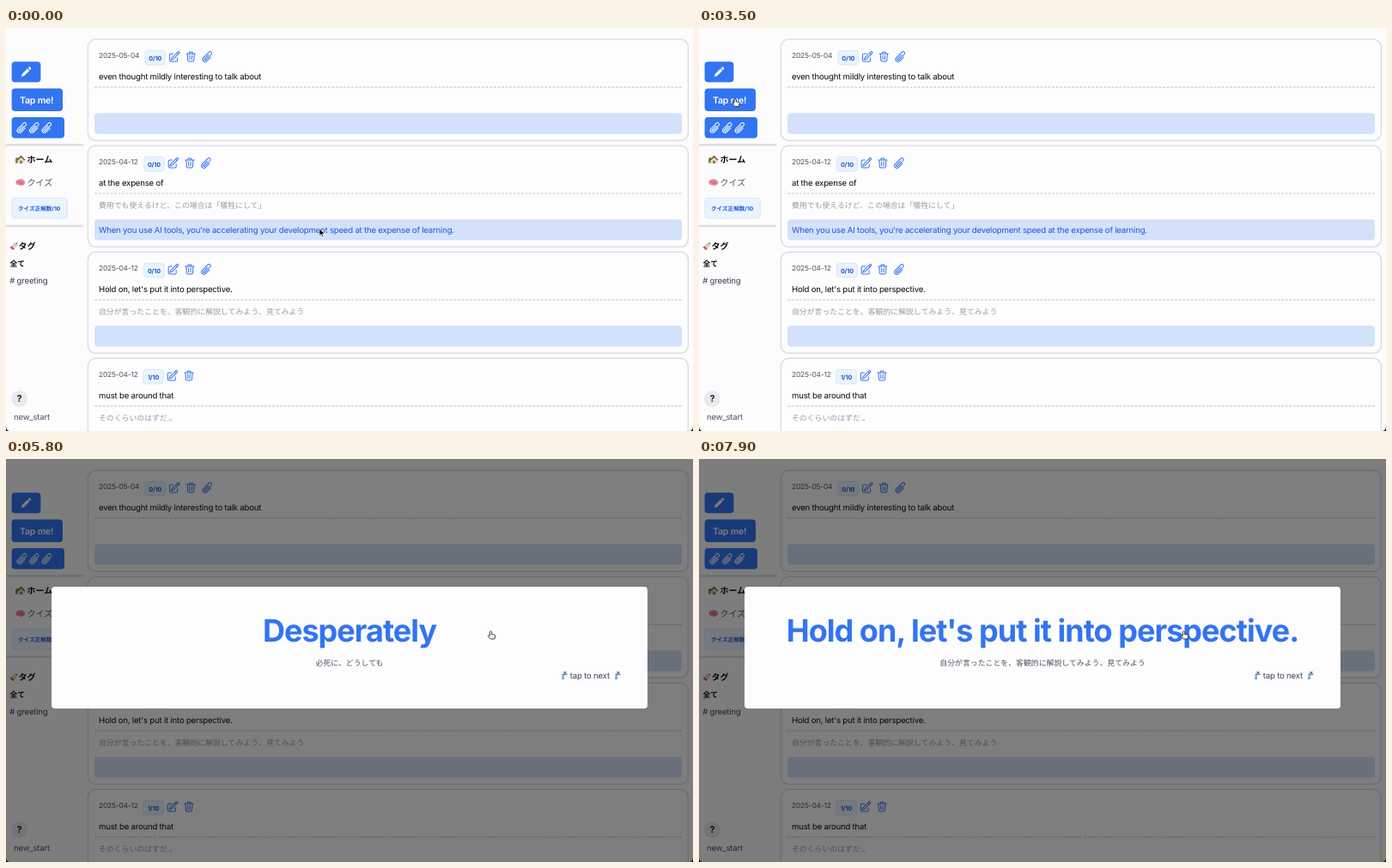
An HTML page that plays this animation: 800x470 px, repeating every 8000 ms.

```html
<!DOCTYPE html>
<html lang="ja">
<head>
<meta charset="utf-8">
<title>Phrase cards</title>
<style>
html, body { margin: 0; width: 100%; height: 100%; overflow: hidden; background: #fcfcfd; }
svg { display: block; width: 800px; height: 470px; }
text {
  font-family: Inter, "Noto Sans CJK JP", "Noto Sans CJK", sans-serif;
  font-optical-sizing: none;
  letter-spacing: -.021em;
  text-rendering: geometricPrecision;
  white-space: pre;
}
.ja { letter-spacing: 0; }
.big { letter-spacing: -.027em; }
</style>
</head>
<body>
<svg id="stage" viewBox="0 0 800 470"></svg>
<script>
const BLUE = '#3374f1', INK = '#0b0b0d', GRAY = '#4b5563', PALE = '#9a9ca4', LINK = '#1f58d6';
const LOOP = 8000, STEP = 100;

const text = (x, y, s, size, fill = INK, extra = '') =>
  `<text x="${x}" y="${y}" font-size="${size}" fill="${fill}" ${extra}>${s}</text>`;
const ja = (x, y, s, size, fill, extra = '') => text(x, y, s, size, fill, 'class="ja" ' + extra);
const box = (x, y, w, h, r, fill, stroke = 'none', sw = 1) =>
  `<rect x="${x}" y="${y}" width="${w}" height="${h}" rx="${r}" fill="${fill}" stroke="${stroke}" stroke-width="${sw}"/>`;
const at = (x, y, body, scale = 1) => `<g transform="translate(${x} ${y}) scale(${scale})">${body}</g>`;
const shape = (d, fill, extra = '') => `<path d="${d}" fill="${fill}" ${extra}/>`;
const BOLD = 'font-weight="700"', MID = 'text-anchor="middle"';

const ICONS = {
  edit: 'M16.9 4.5l1.7-1.7a1.9 1.9 0 1 1 2.6 2.65L10.6 16.1a4.5 4.5 0 0 1-1.9 1.1L6 18l.8-2.7a4.5 4.5 0 0 1 1.1-1.9zL19.5 7.1M18 14v4.75A2.25 2.25 0 0 1 15.75 21H5.25A2.25 2.25 0 0 1 3 18.75V8.25A2.25 2.25 0 0 1 5.25 6H10',
  trash: 'M3.5 6h17M8.7 6V4.5A1.5 1.5 0 0 1 10.2 3h3.6a1.5 1.5 0 0 1 1.5 1.5V6M18.8 6l-1 13.2a2.2 2.2 0 0 1-2.2 2H8.4a2.2 2.2 0 0 1-2.2-2L5.2 6M9.8 9.5l.3 8M14.2 9.5l-.3 8',
  clip: 'M18.4 12.7l-7.7 7.7a4.5 4.5 0 0 1-6.4-6.4L15.3 3.1A3 3 0 1 1 19.5 7.4L8.55 18.3a1.5 1.5 0 0 1-2.1-2.1l7.8-7.8'
};
// Icon centred on cx, cy
const icon = (name, cx, cy, color) => at(cx - 7.2, cy - 7.2,
  shape(ICONS[name], 'none', `stroke="${color}" stroke-width="1.7" stroke-linecap="round" stroke-linejoin="round"`), .6);

const house = shape('M0 9.5V6Q0 3 2 3T4 6V9.5Z', '#5f8f45') +
  shape('M2.5 10V5.5L6.5 2 10.5 5.5V10Z', '#e9d8b8') +
  shape('M1.5 5.8L6.5 .6 11.5 5.8 10.6 6.6 6.5 2.8 2.5 6.6Z', '#7b4a35') +
  shape('M5.4 10V6.8H7.6V10Z', '#8a5a3c');
const brain = shape('M.3 5.5Q0 2 3.5 1.4 7-.2 9.6 2.2 12 4 10.6 6.6 9.6 8.6 7.4 8.2L6.4 9.4 5 7.8Q1 8.4 .3 5.5Z', '#e58a9c') +
  shape('M2 4.8Q3.6 3 5 4.6T8.4 3.4M5 6.4Q7 5 9.4 6', 'none', 'stroke="#b9566e" stroke-width=".7"');
const tag = shape('M0 7.2L5.2 1.6 9 1 8.8 4.8 3.6 10.2Z', '#d9cfc4') +
  shape('M0 7.2L1.6 5.5 5.2 8.6 3.6 10.2Z', '#c8574e') +
  '<circle cx="7.6" cy="2.6" r=".8" fill="#b8473f"/>';
const faucet = shape('M2 4.8V3.6Q2 2.4 4 2.4H8V4.6H4.4V5.4H2Z', '#8d949e') +
  shape('M4.6 2.4V1.2H3.6V.4H7.2V1.2H6.2V2.4Z', '#5c636e') +
  shape('M2.2 5.8H4.2L4.6 9.4H1.4Z', '#5aaae6');

function card(i, date, score, phrase, note, example, shift, hasClip) {
  const y = 13 + 124 * i, cy = y + 20.5;
  return box(95.4, y + .3, 699, 118, 9, '#fdfdfe', '#dcdde5', 1.5) +
    text(108, y + 22.3, date, 8.4, GRAY) +
    box(162 - shift, y + 13.4, 23.6, 16.6, 3, '#ebf3fd', '#cfe1fa', .8) +
    text(173.8 - shift, y + 24.6, score, 7.2, LINK, `${BOLD} ${MID}`) +
    icon('edit', 196 - shift, cy, BLUE) + icon('trash', 215.3 - shift, cy, BLUE) +
    (hasClip ? icon('clip', 234.5 - shift, cy, BLUE) : '') +
    text(108, y + 46.5, phrase, 9.6) +
    `<path d="M103 ${y + 56}H787" stroke="#dedfe4" stroke-width="2.2" stroke-dasharray="3 1.6"/>` +
    ja(108, y + 73, note, 8.9, PALE) +
    box(103, y + 86.2, 684, 24.4, 4, '#d3e1fa') +
    text(108, y + 102.3, example, 9.6, LINK);
}

const perspective = ["Hold on, let's put it into perspective.", '自分が言ったことを、客観的に解説してみよう、見てみよう'];

const cards =
  card(0, '2025-05-04', '0/10', 'even thought mildly interesting to talk about', '', '', 0, true) +
  card(1, '2025-04-12', '0/10', 'at the expense of', '費用でも使えるけど、この場合は「犠牲にして」',
    "When you use AI tools, you're accelerating your development speed at the expense of learning.", 1.4, true) +
  card(2, '2025-04-12', '0/10', ...perspective, '', 1.4, true) +
  card(3, '2025-04-12', '1/10', 'must be around that', 'そのくらいのはずだ.。', '', 2.3, false);

const sidebar =
  box(6.6, 39.2, 33.8, 24, 4, BLUE) +
  at(16.6, 44.2, shape('M2.5 21.5l1-5L14.6 5.4l4 4L7.5 20.5zM15.8 4.2l1.5-1.5a2 2 0 0 1 2.8 0l1.2 1.2a2 2 0 0 1 0 2.8l-1.5 1.5z', '#fff'), .58) +
  box(6.6, 70.6, 59.4, 26.4, 4, BLUE) + text(16, 87.7, 'Tap me!', 10.6, '#fff', 'font-weight="600"') +
  box(6.6, 104, 61.4, 24.4, 4, BLUE) +
  [18.5, 33, 47.5].map(x => icon('clip', x, 116.3, '#fff')).join('') +
  box(0, 135, 90, 2.6, 0, '#dfe0e5') + box(0, 229.6, 90, 2.6, 0, '#dfe0e5') +
  at(11, 148, house) + ja(24.6, 157, 'ホーム', 10, INK, BOLD) +
  at(11, 175.3, brain) + ja(24.6, 183.8, 'クイズ', 10, GRAY, 'font-weight="500"') +
  box(7, 198.4, 64.2, 23.4, 3, '#ebf3fd', '#cfe1fa', .8) +
  ja(14, 212.8, 'クイズ正解数/10', 6.6, LINK, BOLD) +
  at(4.6, 248.8, tag) + ja(14.6, 258, 'タグ', 10, INK, BOLD) +
  ja(4.4, 278.2, '全て', 8.8, INK, BOLD) +
  text(4.2, 298, '# greeting', 9.6, '#374151') +
  '<circle cx="15.5" cy="432.5" r="9.6" fill="#e9eaee"/>' +
  text(15.5, 436.4, '?', 11, '#1f2430', `${BOLD} ${MID}`) +
  text(9, 457, 'new_start', 9.6, GRAY);

const corners = shape('M0 465Q0 470 5 470H0ZM800 465Q800 470 795 470H800Z', '#000');
const ARROW = shape('M0 0V8.3L1.9 6.5 3.1 9.3 4.5 8.7 3.3 6H5.9Z', '#000', 'stroke="#fff" stroke-width=".6"');
const HAND = shape('M-1.1 1Q0-.7 1.1 1V3.8L4.2 4.4Q5.5 4.8 5.2 6.2L4.4 9.4H-.4L-3.2 6Q-3 4.5-1.1 5.6Z', '#fff',
  'stroke="#111" stroke-width=".8" stroke-linejoin="round"');

const words = [
  { from: 4600, title: 'Desperately', note: '必死に、どうしても' },
  { from: 6400, title: 'tendency', note: '' },
  { from: 7500, title: perspective[0], note: perspective[1] }
];

function modal({ title, note }) {
  const top = note ? 149 : 156, h = note ? 142 : 127.4, low = top + h - 35.2;
  return box(0, 0, 800, 470, 0, 'rgba(0,0,0,.5)') +
    box(53, top, 694, h, 4, '#fdfdfe') +
    text(400, top + 63.6, title, 36, BLUE, `class="big" ${BOLD} ${MID}`) +
    ja(400, top + 92.3, note, 8.9, GRAY, MID) +
    at(645.5, low - 8.3, faucet) + text(656.8, low, 'tap to next', 9.6, '#374151') + at(707.5, low - 8.3, faucet);
}

// Pointer stops: time, x, y
const PATH = [
  [0, 365, 234], [100, 345, 212], [200, 345, 212], [500, 150, 97], [600, 150, 97], [800, 132, 69],
  [1900, 132, 69], [2500, 42, 82], [5000, 42, 82], [5700, 564.5, 200.5], [LOOP, 564.5, 200.5]
];

function pointer(t) {
  const i = PATH.findIndex(p => p[0] > t);
  const [t0, x0, y0] = PATH[i - 1], [t1, x1, y1] = PATH[i];
  const k = (t - t0) / (t1 - t0), e = k * k * (3 - 2 * k);
  return [x0 + (x1 - x0) * e, y0 + (y1 - y0) * e];
}

stage.innerHTML = box(0, 0, 800, 470, 0, '#fcfcfd') + sidebar + cards +
  '<g id="dialog"></g><g id="cursor"></g>' + corners;

let shown, kind;
function frame(now) {
  const t = Math.floor(now % LOOP / STEP) * STEP;
  const word = words.filter(w => t >= w.from).pop();
  if (word !== shown) {
    dialog.innerHTML = word ? modal(word) : '';
    shown = word;
  }
  const [x, y] = pointer(t);
  const onButton = x > 6 && x < 66 && y > 70 && y < 97;
  const onModal = word && x > 53 && y > 149;
  const next = t >= 2700 && (onButton || onModal) ? HAND : ARROW;
  if (next !== kind) cursor.innerHTML = kind = next;
  cursor.setAttribute('transform', `translate(${x} ${y})`);
  requestAnimationFrame(frame);
}
frame(0);
</script>
</body>
</html>
```
